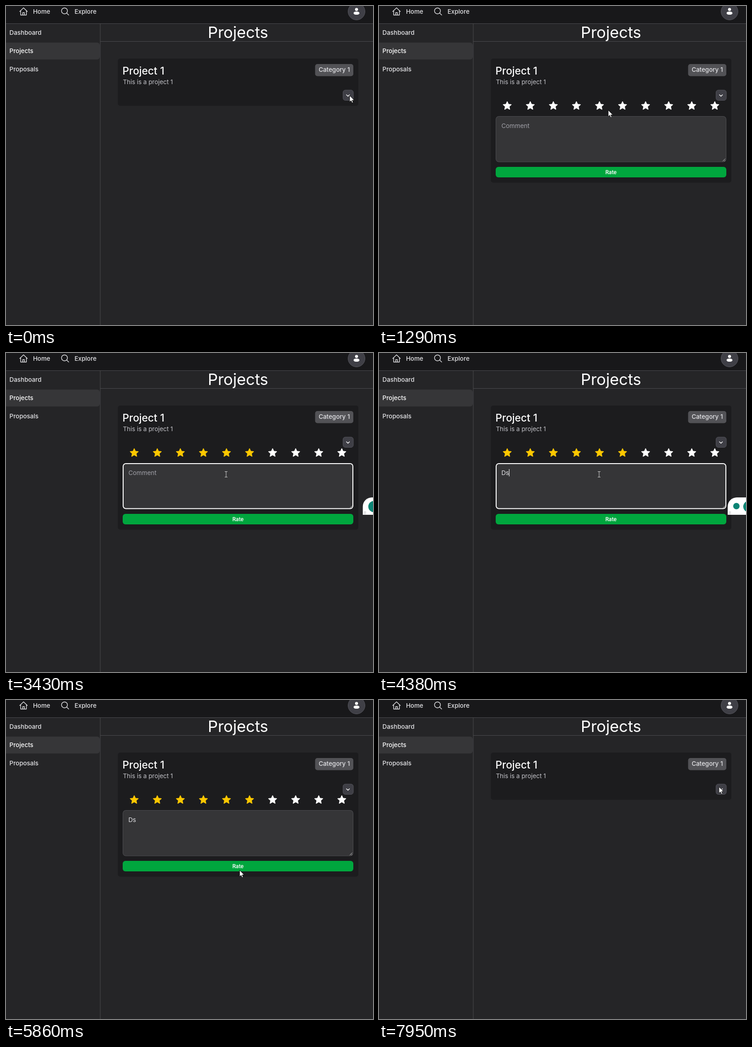
Recreate the animation shown at these times as an HTML page. Size 802 px wide and 698 px high, loop 8000 ms.

```html
<!DOCTYPE html>
<html lang="en">
<head>
<meta charset="utf-8">
<title>Project rating</title>
<style>
  html, body { margin: 0; width: 100%; height: 100%; overflow: hidden; background: #252527; }
  svg { display: block; width: 100vw; height: 100vh; }
  text { font: 400 13.4px Inter, sans-serif; font-optical-sizing: none; fill: #fff; white-space: pre; }
  .nav { font-weight: 500; fill: #e4e4e7; }
  .mid { text-anchor: middle; }
  .line { fill: none; stroke: #e4e4e7; stroke-width: 1.4; stroke-linecap: round; stroke-linejoin: round; }
  .rule { fill: #4a4a4e; }
  #stars { stroke-width: 1.6; stroke-linejoin: round; }
</style>
</head>
<body>
<svg viewBox="0 0 802 698">
  <rect width="802" height="698" fill="#252527"/>
  <rect width="802" height="38" fill="#18181a"/>
  <rect class="rule" y="38" width="802" height="1"/>
  <rect class="rule" x="206" y="77" width="596" height="1"/>
  <rect class="rule" x="205.5" y="39" width="1" height="659"/>

  <path class="line" d="M30 12L38.3 4 46.6 12M32 10V19.7H44.6V10M36.5 19.7V14.5H40.2V19.7"/>
  <circle class="line" cx="127.8" cy="10.7" r="6.5"/>
  <path class="line" d="M132.5 15.4L137 19.8"/>
  <text class="nav" x="58.9" y="17">Home</text>
  <text class="nav" x="149.7" y="17">Explore</text>
  <circle cx="766" cy="12" r="18.5" fill="#3f3f46" stroke="#55555c"/>
  <circle cx="766" cy="7.6" r="3.3" fill="#fff"/>
  <rect x="759.6" y="12.3" width="12.8" height="6.7" rx="5" ry="3.6" fill="#fff"/>

  <rect x="-8" y="80" width="213" height="37" rx="6" fill="#363638"/>
  <text class="nav" x="7.6" y="63">Dashboard</text>
  <text class="nav" x="7.6" y="103" style="fill:#fff">Projects</text>
  <text class="nav" x="7.6" y="142.5">Proposals</text>
  <text class="mid" x="507" y="70" style="font-size:34.4px">Projects</text>

  <rect id="card" x="244.5" y="115" width="525.5" rx="5" fill="#1c1c1e"/>
  <text x="254.6" y="150" style="font-size:22.6px;font-weight:500">Project 1</text>
  <text x="255.4" y="171.4" style="fill:#c4c4c9">This is a project 1</text>
  <rect x="675.5" y="127" width="83.5" height="26.5" rx="5" fill="#525256"/>
  <text class="mid nav" x="717.3" y="144">Category 1</text>
  <rect x="736.5" y="184" width="22.5" height="22.5" rx="5" fill="#3f3f46" stroke="#53535b"/>
  <path class="line" d="M744 194.3l3.3 3.2 3.3-3.2" style="stroke:#fff"/>

  <g id="form">
    <g id="stars"></g>
    <rect id="ring" x="255" y="241" width="504" height="100.5" rx="7"/>
    <rect id="box" fill="#353537"/>
    <path d="M751.3 339.5l5.2-5.2M754.7 339.7l2-2" stroke="#d0d0d0"/>
    <text id="note" x="267.4" y="266.5"></text>
    <rect id="caret" y="254" width="1" height="16" fill="#fff"/>
    <rect x="255" y="352" width="504" height="23" rx="6" fill="#00a63e"/>
    <text class="mid" x="507" y="367.6" style="font-size:11.46px;font-weight:600">Rate</text>
  </g>

  <g id="helper">
    <path d="M0 354V336A20 20 0 0 1 20 316H60V354Z" fill="#fff"/>
    <path d="M3.6 346.4V353M6.1 346.4V353" stroke="#8a8a90" stroke-width="1.2" stroke-dasharray="1.2"/>
    <circle id="tip" cx="19" cy="335" r="7" fill="#0b8474"/>
    <circle id="badge" cy="336" r="12.5" fill="#0b8474"/>
  </g>

  <g id="cursor">
    <path id="arrow" d="M0 0V14L3.2 11 5.3 15.9 7.6 14.9 5.5 10.2H9.9Z" fill="#fff" stroke="#000" stroke-width=".8"/>
    <path id="beam" d="M-3-5.5H3M0-5.5V6.5M-3 6.5H3" fill="none" stroke="#d0d0d0"/>
  </g>
</svg>
<script>
const LOOP = 8000;
const OPEN = 280, RATED = 1770, FOCUS = 2540, SENT = 5600, RESET = 5940, CLOSE = 6570;
const WORD = "Ds", TYPE = 3840, KEY = 290, BLINK = 530;
const $ = id => document.getElementById(id);

// Each move: start, end, then where it goes
const mouse = [
  [520, 910, 392, 270], [910, 1290, 501, 228], [1360, 1520, 527, 218],
  [2120, 2400, 481, 265], [4900, 5320, 491, 348], [5380, 5940, 511, 373],
  [7110, 7200, 486, 369], [7200, 7950, 743, 190]
];
const slide = [[2850, 2950, 792], [3380, 3600, 762]];

const easeOut = k => 1 - (1 - k) ** 2;

function follow(from, moves, t) {
  return moves.reduce((pos, [start, end, ...to]) => {
    const k = easeOut(Math.min(1, Math.max(0, (t - start) / (end - start))));
    return pos.map((v, i) => v + (to[i] - v) * k);
  }, from);
}

function set(id, attrs) {
  for (const name in attrs) $(id).setAttribute(name, attrs[name]);
}
const show = (id, on) => { $(id).style.display = on ? "" : "none"; };

function starPoints(cx, cy) {
  return Array.from({ length: 10 }, (_, i) => {
    const r = i % 2 ? 4.3 : 9.2, a = i * Math.PI / 5;
    return [cx + r * Math.sin(a), cy - r * Math.cos(a)];
  }).join(" ");
}

const stars = Array.from({ length: 10 }, (_, i) => {
  const s = document.createElementNS("http://www.w3.org/2000/svg", "polygon");
  s.setAttribute("points", starPoints(255 + 50.4 * (i + 0.5), 218.6));
  return $("stars").appendChild(s);
});

function drawText(t, focus) {
  const typed = t < RESET ? Math.min(WORD.length, Math.max(0, Math.floor((t - TYPE) / KEY) + 1)) : 0;
  const since = typed ? TYPE + (typed - 1) * KEY : FOCUS;
  const note = $("note");
  note.textContent = WORD.slice(0, typed) || "Comment";
  note.style.fill = typed ? "#e4e4e7" : "#a1a1a8";
  const width = typed ? note.getComputedTextLength() : 0;
  set("caret", { x: Math.round(267.5 + width) });
  show("caret", focus && (t - since) % (2 * BLINK) < BLINK);
}

function drawForm(t) {
  const open = t >= OPEN && t < CLOSE;
  set("card", { height: open ? 271.5 : 103.5 });
  set("form", { opacity: t < 370 ? 0.5 : 1 });
  show("form", open);

  const rated = t >= RATED && t < RESET;
  stars.forEach((s, i) => {
    const color = rated && i < 6 ? "#fdc700" : "#fff";
    s.setAttribute("fill", color);
    s.setAttribute("stroke", color);
  });

  const focus = t >= FOCUS && t < SENT, w = focus ? 2 : 1;
  set("ring", { fill: focus ? "#fff" : "#4c4c50" });
  set("box", { x: 255 + w, y: 241 + w, width: 504 - 2 * w, height: 100.5 - 2 * w, rx: 7 - w });
  drawText(t, focus);
}

function drawHelper(t) {
  const wide = t >= 3600;
  const [x] = follow([802], slide, t);
  set("helper", { transform: `translate(${x} 0)` });
  set("badge", { cx: wide ? 46.5 : 24.5 });
  show("tip", wide);
  show("helper", t < SENT);
}

function drawCursor(t) {
  const [x, y] = follow([751, 196], mouse, t);
  const overBox = t >= OPEN && t < CLOSE && x > 255 && x < 759 && y > 241 && y < 341;
  set("cursor", { transform: `translate(${x} ${y})` });
  show("arrow", !overBox);
  show("beam", overBox);
}

const start = performance.now();
function frame() {
  const t = (performance.now() - start) % LOOP;
  drawForm(t);
  drawHelper(t);
  drawCursor(t);
  requestAnimationFrame(frame);
}
frame();
</script>
</body>
</html>
```
